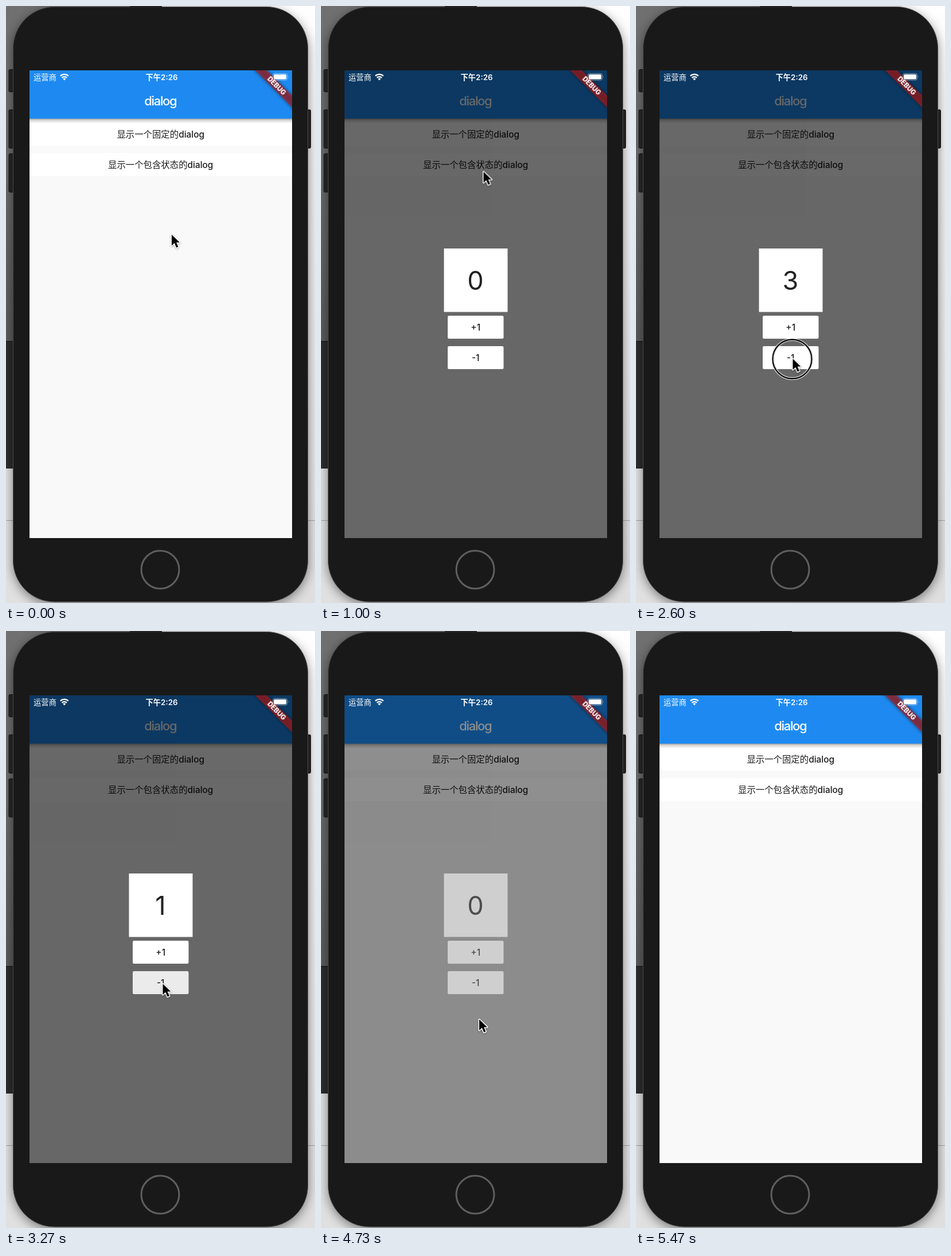
Recreate the animation shown at these times as an HTML page. Size 539 by 1039 pixels, loop 5.54 s.

```html
<!DOCTYPE html>
<html lang="zh-CN">
<head>
<meta charset="utf-8">
<title>dialog</title>
<style>
  html, body { margin: 0; width: 100%; height: 100%; overflow: hidden; background: #e4e4e4; }
  svg { display: block; width: 539px; height: 1039px; }
  text {
    font: 500 15.4px Inter, "Noto Sans CJK SC", "Noto Sans CJK JP", sans-serif;
    fill: #1c1c1c; text-anchor: middle;
  }
  .title { font-size: 22px; letter-spacing: -1.3px; fill: #fff; }
  .status { font-size: 13.3px; font-weight: 400; fill: #fff; }
  .time { font-weight: 600; }
  .debug { font-size: 11.5px; font-weight: 800; fill: #fff; }
  .count text { font-size: 45px; font-weight: 400; fill: #222; }
  .phone { filter: drop-shadow(0 5px 9px rgba(0, 0, 0, .45)); }
  .arrow { filter: drop-shadow(0 1.5px 1.5px rgba(0, 0, 0, .35)); }

  .barrier, .dialog, .ripple, .press, .count, .cursor, .ring {
    animation: 5540ms linear infinite;
  }
  .barrier { animation-name: barrier; }
  .dialog { animation-name: dialog; }
  .ripple { animation-name: ripple; transform-box: fill-box; transform-origin: center; }
  .press { opacity: 0; }
  .plus { animation-name: plus; }
  .minus { animation-name: minus; }
  .count { animation-name: count; animation-timing-function: step-end; }
  .cursor { animation-name: move; }
  .ring { animation-name: click; animation-timing-function: step-end; }

  @keyframes barrier {
    0%, 11.19% { opacity: 0; }
    12.09% { opacity: .444; }
    13.9%, 84.48% { opacity: .59; }
    85.38% { opacity: .444; }
    87.18%, 100% { opacity: 0; }
  }
  @keyframes dialog {
    0%, 11.19% { opacity: 0; }
    12.09% { opacity: .59; }
    13.9%, 84.48% { opacity: 1; }
    85.38% { opacity: .59; }
    87.18%, 100% { opacity: 0; }
  }
  @keyframes ripple {
    0%, 10.1% { opacity: 0; transform: scale(.2); }
    10.6% { opacity: .12; transform: scale(.45); }
    12.09% { opacity: .12; transform: scale(1); }
    15.7%, 100% { opacity: 0; transform: scale(2.3); }
  }
  @keyframes plus {
    0%, 31.8% { opacity: 0; }
    33.2%, 41.2% { opacity: .075; }
    43.8%, 100% { opacity: 0; }
  }
  @keyframes minus {
    0%, 47.1%, 51.8%, 57%, 61.7%, 66.8%, 71.5%, 100% { opacity: 0; }
    48.3%, 49.5%, 58.2%, 59.4%, 68%, 69.2% { opacity: .075; }
  }
  @keyframes count {
    0%, 68.23%, 100% { transform: none; }
    33.21%, 58.48% { transform: translateY(-111px); }
    36.82%, 48.56% { transform: translateY(-222px); }
    40.61% { transform: translateY(-333px); }
  }
  @keyframes move {
    0%, 3.61% { transform: translate(288px, 395px); animation-timing-function: ease-in-out; }
    8.48%, 16.25% { transform: translate(283px, 270px); animation-timing-function: ease-in-out; }
    27.08%, 40.97% { transform: translate(275px, 543px); }
    44.04%, 74.91% { transform: translate(272.5px, 611px); animation-timing-function: ease-in-out; }
    80.32%, 93% { transform: translate(275px, 673px); visibility: visible; }
    93.01%, 100% { transform: translate(275px, 673px); visibility: hidden; }
  }
  @keyframes click {
    0%, 11.55%, 33.21%, 36.82%, 40.61%, 48.56%, 58.48%, 68.23%, 83.6%, 100% { opacity: 0; }
    9.03%, 31.23%, 35.2%, 39%, 46.4%, 56.3%, 66.1%, 81.4% { opacity: 1; }
  }
</style>
</head>
<body>
<svg viewBox="0 0 539 1039">
  <defs>
    <linearGradient id="wall" x2="0" y2="1">
      <stop stop-color="#707070"/><stop offset=".5" stop-color="#6a6a6a"/><stop offset="1" stop-color="#5a5a5a"/>
    </linearGradient>
    <linearGradient id="side" x2="0" y2="1">
      <stop stop-color="#fff"/><stop offset=".2" stop-color="#f0f0f0"/><stop offset="1" stop-color="#dedede"/>
    </linearGradient>
    <linearGradient id="fall" x2="0" y2="1">
      <stop stop-opacity=".36"/><stop offset=".4" stop-opacity=".12"/><stop offset="1" stop-opacity="0"/>
    </linearGradient>
    <filter id="soft" x="-20%" y="-80%" width="140%" height="260%"><feGaussianBlur stdDeviation="3"/></filter>
    <clipPath id="screen"><path d="M41 112h458v814H41z"/></clipPath>
    <clipPath id="row"><path d="M41 256h458v40H41z"/></clipPath>
    <clipPath id="card"><path d="M214.5 422h111v110.5h-111z"/></clipPath>
  </defs>

  <!-- desktop -->
  <path fill="url(#side)" d="M270 0h269v1039H270z"/>
  <path fill="url(#wall)" d="M0 0h272v584H0z"/>
  <path fill="#2d2d2d" d="M0 584h200v221H0z"/>
  <path fill="#1c1c1c" d="M0 583h200v1.5H0z"/>
  <path fill="#e0e0e0" d="M0 805.5h270V1039H0z"/>
  <path fill="#a2a2a2" d="M0 895h539v1H0z"/>

  <!-- phone -->
  <g fill="#282828" stroke="#151515">
    <rect x="5" y="110.5" width="14" height="39" rx="2"/>
    <rect x="5" y="180.5" width="14" height="67" rx="2"/>
    <rect x="5" y="257" width="14" height="67" rx="2"/>
    <rect x="518" y="180.5" width="13.5" height="67" rx="2"/>
  </g>
  <rect class="phone" x="12.5" y="1.5" width="514" height="1035.5" rx="72" fill="#191919" stroke="#4b4b4b"/>
  <path fill="#242424" d="M216 0h56v2.5h-56z"/>
  <circle cx="269" cy="981" r="33" fill="none" stroke="#5f5f5f" stroke-width="3"/>

  <g clip-path="url(#screen)">
    <!-- page -->
    <path fill="#f9f9f9" d="M41 112h458v814H41z"/>
    <path fill="#fff" d="M41 203h458v40H41zM41 256h458v40H41z"/>
    <g clip-path="url(#row)"><circle class="ripple" cx="284.5" cy="276" r="74"/></g>
    <path fill="url(#fall)" d="M41 196h458v8H41z"/>
    <path fill="#1e8af1" d="M41 112h458v84H41z"/>
    <text class="title" x="269.3" y="173">dialog</text>
    <text x="269.7" y="228.5">显示一个固定的dialog</text>
    <text x="269.7" y="281.5">显示一个包含状态的dialog</text>

    <!-- dialog -->
    <path class="barrier" d="M41 112h458v814H41z"/>
    <g class="dialog">
      <path fill="#fff" d="M214.5 422h111v110.5h-111z"/>
      <g clip-path="url(#card)">
        <g class="count">
          <text x="269.5" y="493.5">0</text>
          <text x="269.5" y="604.5">1</text>
          <text x="269.5" y="715.5">2</text>
          <text x="269.5" y="826.5">3</text>
        </g>
      </g>
      <rect x="221" y="539" width="97.5" height="40" rx="2.5" fill="#fff"/>
      <rect x="221" y="592" width="97.5" height="40" rx="2.5" fill="#fff"/>
      <rect class="press plus" x="221" y="539" width="97.5" height="40" rx="2.5"/>
      <rect class="press minus" x="221" y="592" width="97.5" height="40" rx="2.5"/>
      <text x="269.7" y="564.5">+1</text>
      <text x="269.7" y="617.5">-1</text>
    </g>

    <!-- debug banner -->
    <g transform="translate(499 112) rotate(45)">
      <path fill-opacity=".5" filter="url(#soft)" d="M-60 30.9H60v14.6H-60z"/>
      <path fill="#b71c1c" fill-opacity=".63" d="M-60 30.9H60v14.6H-60z"/>
      <text class="debug" y="42.3">DEBUG</text>
    </g>

    <!-- status bar -->
    <text class="status" x="68" y="128.5">运营商</text>
    <text class="status time" x="271.5" y="128.5">下午2:26</text>
    <g fill="none" stroke="#fff" stroke-width="2.3">
      <path d="M94.8 121.8a10 10 0 0 1 14 0M97.6 124.9a6 6 0 0 1 8.4 0"/>
      <path fill="#fff" stroke="none" d="M101.8 129.4l-2.5-2.6a3.6 3.6 0 0 1 5 0z"/>
    </g>
    <rect x="465.5" y="117.5" width="25" height="11.5" rx="3" fill="none" stroke="#fff" stroke-opacity=".5"/>
    <rect x="467" y="119" width="22" height="8.5" rx="1.8" fill="#fff"/>
    <path fill="#fff" fill-opacity=".6" d="M492 121.2q1.6 2 0 4z"/>
  </g>

  <!-- pointer -->
  <g class="cursor">
    <g class="ring" fill="none">
      <circle cy="3.5" r="34" stroke="#fff" stroke-width="4.6"/>
      <circle cy="3.5" r="34" stroke="#000" stroke-width="2.4"/>
    </g>
    <path class="arrow" stroke="#fff" stroke-width="3" stroke-linejoin="round" paint-order="stroke"
      d="M1 3V22l4.8-4.4 3.4 8 3.3-1.5-3.4-7.7H15z"/>
  </g>
</svg>
</body>
</html>
```
